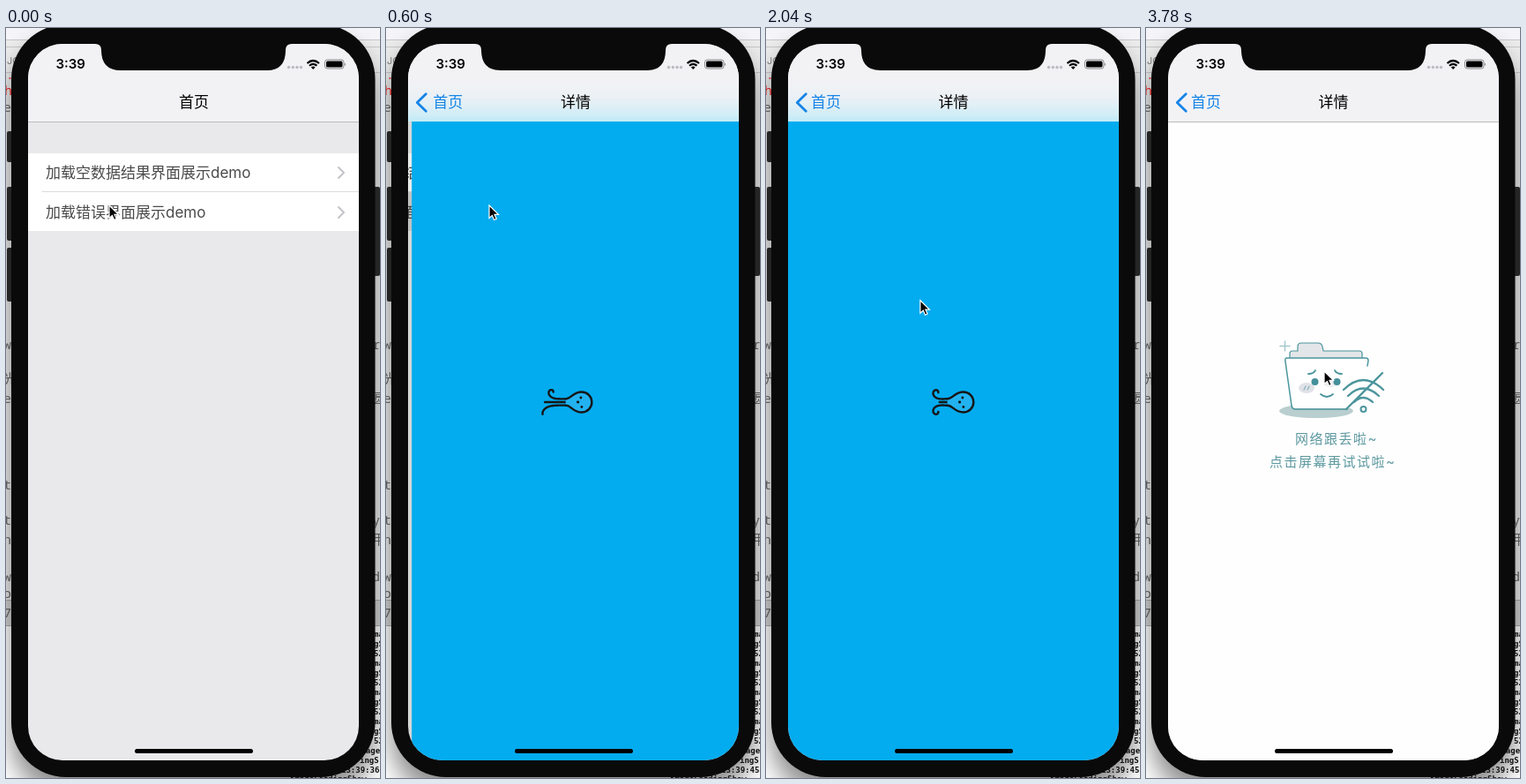
Write an HTML page that moves like this. It is 424 by 850 pixels and loops after 3840 ms.

```html
<!DOCTYPE html>
<html lang="zh-CN">
<head>
<meta charset="utf-8">
<style>
  html, body { margin: 0; width: 100%; height: 100%; overflow: hidden; background: #ececec; }
  svg { display: block; width: 424px; height: 850px; font-family: Inter, "Noto Sans CJK SC", "Noto Sans CJK", sans-serif; }
  .line { fill: none; stroke-linecap: round; stroke-linejoin: round; }
  .title { font-size: 17px; font-weight: 500; }
  .row { font-size: 17px; fill: #4a4a4a; }
  .note { font-size: 15px; letter-spacing: 1.5px; fill: #5b989f; }
  .code { font: 15px "Noto Sans Mono", "Noto Sans CJK SC", monospace; fill: #555; }
  .log { font: bold 9px "DejaVu Sans Mono", monospace; fill: #111; }
  .teal { stroke: #4b959c; }
</style>
</head>
<body>
<svg viewBox="0 0 424 850">
  <defs>
    <clipPath id="screen"><rect x="25" y="18" width="375" height="812" rx="39"/></clipPath>
    <clipPath id="bar"><path d="M25 18H400V106H25Z"/></clipPath>
    <filter id="soft" x="-20%" y="-80%" width="140%" height="260%"><feGaussianBlur stdDeviation="20"/></filter>
    <filter id="shade" x="-20%" y="-20%" width="140%" height="140%"><feGaussianBlur stdDeviation="14"/></filter>
  </defs>

  <!-- desktop behind the phone -->
  <path fill="#ececec" d="M0 0H424V850H0Z"/>
  <path fill="#f5f4f8" d="M0 0H424V13H0Z"/>
  <path class="line" stroke="#c8c8c8" d="M0 13.5H424M0 21.5H424M0 50.5H424"/>
  <path fill="#d4d4d4" d="M0 648H424V678H0Z"/>
  <path class="line" stroke="#aaa" d="M0 648.5H424M0 677.5H424"/>
  <path fill="#fff" d="M0 678H424V850H0Z"/>
  <rect x="6" y="16" width="412" height="853" rx="62" opacity=".45" filter="url(#shade)"/>
  <g id="desk"></g>

  <!-- phone body -->
  <g fill="#252525">
    <rect x="1" y="117" width="10" height="35" rx="2"/>
    <rect x="1" y="180" width="10" height="61" rx="2"/>
    <rect x="1" y="249" width="10" height="61" rx="2"/>
    <rect x="414" y="180" width="10" height="101" rx="2"/>
  </g>
  <rect x="6" y="-4" width="412.5" height="853" rx="62" fill="#0a0a0a"/>

  <g clip-path="url(#screen)">
    <path fill="#e9e9eb" d="M25 18H400V830H25Z"/>
    <g id="list">
      <path fill="#fff" d="M25 142H400V230H25Z"/>
      <path id="pressed" fill="#d2d2d2" d="M25 186H400V230H25Z"/>
      <path class="line" stroke="#dcdcde" d="M41 185.5H400"/>
      <text class="row" x="45" y="170">加载空数据结果界面展示demo</text>
      <text class="row" x="45" y="215">加载错误界面展示demo</text>
      <path class="line" stroke="#c4c4c8" stroke-width="2" d="M377 158l6 6-6 6M377 203l6 6-6 6"/>
    </g>
    <path id="dim" d="M25 106H400V830H25Z"/>
    <g id="detail">
      <path id="page" d="M25 106H400V830H25Z"/>
      <g id="squid" class="line" stroke="#161616" stroke-width="2.4">
        <path id="arms"/>
        <path id="head" fill="#22b2ef"/>
        <path id="face" stroke-width="2.8"/>
      </g>
      <g id="failed" class="line" stroke-width="1.5">
        <ellipse cx="193" cy="434" rx="42" ry="8" fill="#b9cecf"/>
        <path stroke="#a5c9cd" d="M152 360.5h11M157.5 355v11"/>
        <path class="teal" fill="#e3e6e9" stroke-width="1.2" d="M163 375V369q0-3 3-3H172V361q0-4 4-4H195q4 0 5 4l1 5H242q3 0 3 3V375Z"/>
        <path fill="#fff" d="M158 374H252L243 431H166Z"/>
        <path class="teal" d="M251 383l1-6q0-3-3-3H160q-3 0-2 4l7 50q1 4 4 4H228"/>
        <ellipse cx="182" cy="408" rx="9" ry="6" fill="#e0e2e8"/>
        <ellipse cx="209" cy="402" rx="8" ry="5" fill="#eceef1"/>
        <path stroke="#85b3b8" stroke-width="1.2" d="M179 410l2-4M183 410l2-4"/>
        <g fill="#43909a"><circle cx="191.5" cy="401" r="4"/><circle cx="216.5" cy="401" r="4"/></g>
        <path class="teal" stroke-width="1.8" d="M184 392q6 0 8-4M214 388q2 4 8 4M198 415q7 6 14 0"/>
        <path class="teal" stroke-width="2.3" d="M224 410q22-22 45 0M229 417q17-17 35 0M236 424q10-10 21 0M268 391L227 432"/>
        <circle class="teal" cx="246.5" cy="432" r="3" stroke-width="2"/>
        <text class="note" x="169" y="471">网络跟丢啦~</text>
        <text class="note" x="140" y="497">点击屏幕再试试啦~</text>
      </g>
    </g>

    <!-- navigation and status bars -->
    <path fill="#f2f2f5" d="M25 18H400V106H25Z"/>
    <g clip-path="url(#bar)"><rect id="glow" y="106" width="500" height="80" fill="#30d8ff" filter="url(#soft)"/></g>
    <path id="rule" class="line" stroke="#bcbcbf" d="M25 106.5H400"/>
    <path id="back" class="line" stroke="#1583e6" stroke-width="2.8" d="M45.3 74.7l-10 9.8 10 9.8"/>
    <text id="home" class="title" y="90">首页</text>
    <text id="backLabel" y="90" font-size="17" fill="#1583e6">首页</text>
    <text id="detailTitle" class="title" y="90">详情</text>
    <text x="56.5" y="46" font-size="15" font-weight="600">3:39</text>
    <g fill="#bcbcc0"><circle cx="320.5" cy="44.5" r="1.7"/><circle cx="325.3" cy="44.5" r="1.7"/><circle cx="330" cy="44.5" r="1.7"/><circle cx="334.5" cy="44.5" r="1.7"/></g>
    <path class="line" stroke="#000" stroke-width="2.2" style="stroke-linecap:butt" d="M341.5 40q6.5-6 13.5 0M344 42.7q4-3.7 8.5 0"/>
    <path d="M345.8 44.5q2.4-2 4.8 0l-2.4 2.5Z"/>
    <rect x="361.5" y="36" width="21.5" height="10" rx="2.8" fill="none" stroke="#888"/>
    <rect x="363" y="37.5" width="18.5" height="7" rx="1.5"/>
    <path fill="#888" d="M384 39.5q2 1.5 0 3.5Z"/>
    <rect x="146" y="817" width="134" height="5" rx="2.5"/>
  </g>
  <path fill="#0a0a0a" d="M101 17V18q7 0 7 7q0 23 22 23H296q21 0 21-23q0-7 7-7V17Z"/>
  <path id="cursor" stroke="#fff" stroke-width="1.2" d="M0 0V14.5L3.4 11.4 5.6 16.5 8.2 15.3 6 10.4H10.5Z"/>
</svg>

<script>
const LOOP = 3840, STEP = 60, PUSH = 212, PUSH_TIME = 500, FAIL = 2760, SWIM = 1920;
const $ = id => document.getElementById(id);
const set = (id, attrs) => { for (const k in attrs) $(id).setAttribute(k, attrs[k]); };
const clamp = v => Math.min(1, Math.max(0, v));

// Interpolates rows of [position, ...values]
function sample(keys, p) {
  const i = Math.max(1, keys.findIndex(k => k[0] >= p));
  const a = keys[i - 1], b = keys[i], u = clamp((p - a[0]) / (b[0] - a[0]));
  return a.slice(1).map((v, j) => v + (b[j + 1] - v) * u);
}

const mouse = [
  [0, 117, 201], [1140, 117, 201], [1560, 140, 239], [2400, 201, 361],
  [3120, 201, 361], [3600, 202, 389], [LOOP, 202, 389]
];
// phase, head x, arm length, upper curl, lower curl, hook sharpness, neck, tilt, middle arm
const swim = [
  [0, 210.5, 36, 6.5, 6.5, 2, 4, 0, 13],
  [.125, 220, 30, 4, 0, 4, 3.5, 0, 26],
  [.3125, 246, 30, 0, 0, 4, 2, .1, 14],
  [.594, 245, 19, 2, 2, 4, 3.5, -.16, 0],
  [1, 210.5, 36, 6.5, 6.5, 2, 4, 0, 13]
];

// One arm trailing left from the neck, bending more towards its tip
function arm(x, y, side, length, curl, hook, tilt) {
  const n = 30;
  let d = `M${x} ${y}`;
  for (let i = 1; i <= n; i++) {
    const angle = tilt + curl * (i / n) ** hook;
    x -= Math.cos(angle) * length / n;
    y += side * Math.sin(angle) * length / n;
    d += `L${x.toFixed(2)} ${y.toFixed(2)}`;
  }
  return d;
}

function drawSquid(phase) {
  const [x, length, up, down, hook, neck, tilt, mid] = sample(swim, phase), y = 424, nx = x - 18;
  set('arms', { d: arm(nx, y - neck, -1, length, up, hook, tilt) + arm(nx, y + neck, 1, length, down, hook, tilt) +
    (mid > 1 ? `M${nx - 1} ${y}h${-mid}` : '') });
  set('head', { d: `M${nx} ${y - neck}C${x - 12} ${y - neck} ${x - 10} ${y - 11.5} ${x} ${y - 11.5}` +
    `A11.5 11.5 0 0 1 ${x} ${y + 11.5}C${x - 10} ${y + 11.5} ${x - 12} ${y + neck} ${nx} ${y + neck}` });
  const front = phase < .22 || phase > .8;
  set('face', { d: front ? `M${x - 1} 419h.1M${x} 429.5h.1M${x - 4.5} 424h.5` : `M${x - 1} 418.5h.1` });
}

function draw(t) {
  const left = (1 - clamp((t - PUSH) / PUSH_TIME)) ** 3, e = 1 - left;
  const pushed = t >= PUSH, failed = t >= FAIL;
  set('list', { transform: `translate(${-112 * e})` });
  set('pressed', { opacity: pushed ? 1 : 0 });
  set('dim', { opacity: .08 * e });
  set('detail', { transform: `translate(${375 * left})` });
  set('page', { fill: failed ? '#fefefe' : '#03acef' });
  set('squid', { opacity: failed ? 0 : 1 });
  set('failed', { opacity: failed ? 1 : 0 });
  set('glow', { x: -15 + 562 * left, opacity: failed || !pushed ? 0 : .5 });
  set('rule', { opacity: pushed && !failed ? left : 1 });

  const labelX = 51 + 145 * left ** .92;
  set('home', { x: labelX, opacity: clamp(1 - 2 * e) });
  set('backLabel', { x: labelX, opacity: clamp(2 * e) });
  set('back', { opacity: clamp(1.3 * e) });
  set('detailTitle', { x: 195.5 + 225 * left, opacity: e });

  drawSquid(((t - 420) / SWIM + 1) % 1);
  const [x, y] = sample(mouse, t);
  set('cursor', { transform: `translate(${x} ${y})` });
  $('clock').textContent = pushed ? '13:39:45' : '13:39:36';
}

function deskText(x, y, text, cls = 'code', id = '', fill = '') {
  const style = fill && ` style="fill:${fill}"`;
  return `<text x="${x}" y="${y}" class="${cls}" id="${id}"${style}>${text}</text>`;
}

let desk = '<text x="1" y="41" font-size="11" fill="#777">JO</text>' +
  deskText(0, 58, '.', 'code', '', '#c22') + deskText(-2, 76, 'h', 'code', '', '#c22');
for (const [y, s] of [[95, 'e'], [364, 'w'], [403, '光'], [425, 'e'], [523, 't'], [563, 't'], [585, 'n'], [627, 'w'], [646, 'o'], [668, '7']])
  desk += deskText(-3, y, s);
for (const [y, s] of [[364, 'r'], [425, '圆'], [563, 'y'], [585, '用'], [627, 'd']])
  desk += deskText(415, y, s);
for (let i = 0; i < 15; i++) {
  const y = 690 + i * 11, low = i > 11;
  const text = ['Image', 'ingS', '13:39:36'][i % 3];
  desk += low ? deskText([397, 401, 380][i % 3], y, text, 'log', i === 14 ? 'clock' : '')
              : deskText(417, y, ['ma', 'gS', '52:'][i % 3], 'log');
}
desk += deskText(322, 854, 'imageLoadingShow', 'log');
$('desk').innerHTML = desk;

const start = performance.now();
function tick() {
  const t = (performance.now() - start) % LOOP;
  draw(Math.floor(t / STEP) * STEP);
  requestAnimationFrame(tick);
}
tick();
</script>
</body>
</html>
```
